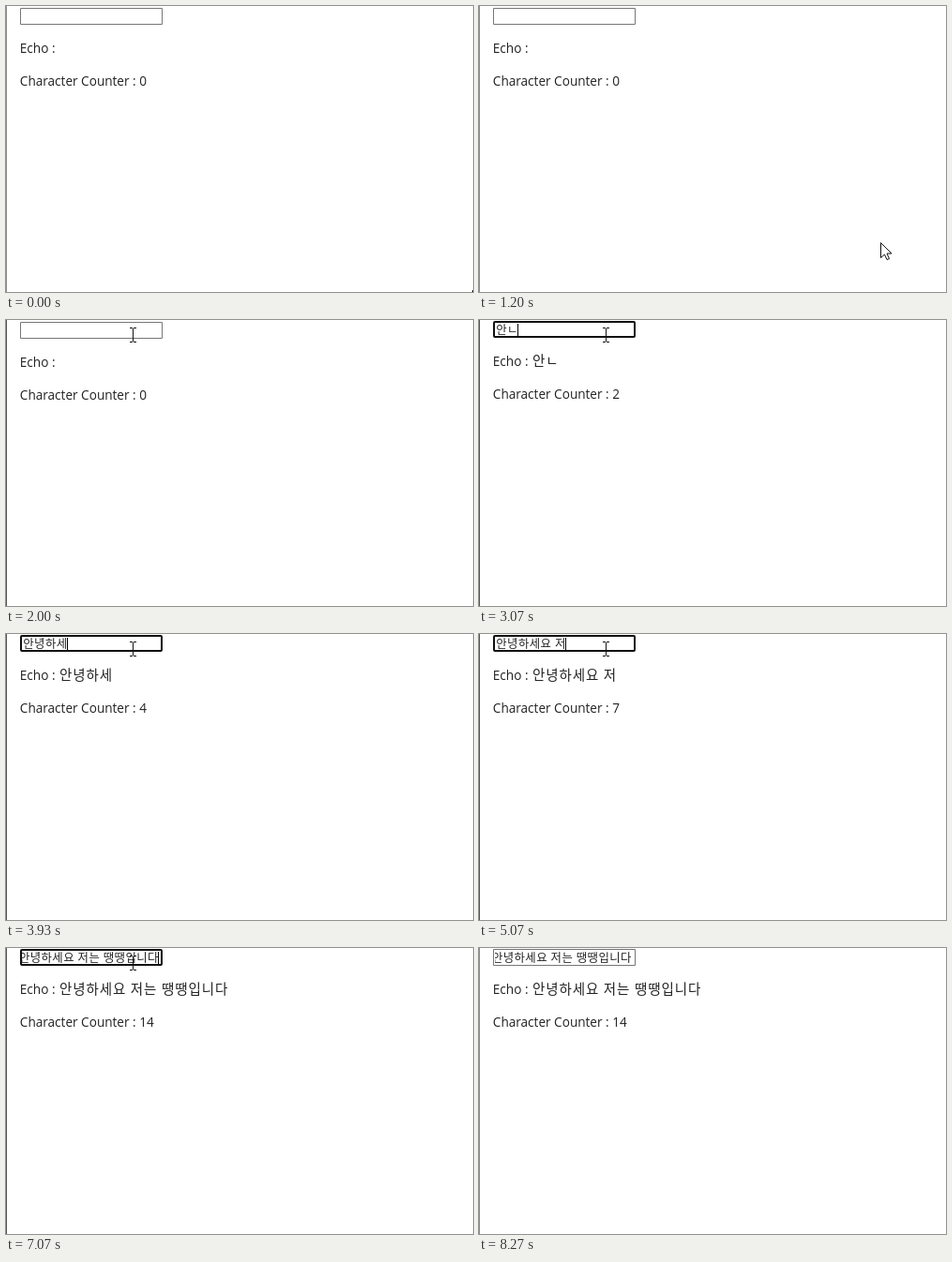
Write an HTML page with a canvas that moves like this. It is 498 px wide and 305 px high and loops after 8.47 s.

```html
<!DOCTYPE html>
<html lang="ko">
<head>
<meta charset="utf-8">
<title>Echo and character counter</title>
<style>
  html, body { margin: 0; width: 100%; height: 100%; overflow: hidden; background: #fff; }
  canvas { display: block; }
</style>
</head>
<body>
<canvas id="stage" width="498" height="305"></canvas>
<script>
const ctx = document.getElementById('stage').getContext('2d', { alpha: false });
const LOOP = 8470, TICK = 1000 / 15, BLINK = 535;
const FOCUS = 2325, BLUR = 8265, ACTIVE = 1795;

const hangul = size => `300 ${size}px "Open Sans", "Noto Sans CJK KR", sans-serif`;
const LABEL = { font: '13.6px "Open Sans", "Noto Sans", sans-serif', spacing: '0px' };
const ECHO = { font: hangul(14.5), spacing: '0.9px' };
const INPUT = { font: hangul(12.4), spacing: '0.4px' };

// Each keystroke: time and the field's value while the syllable is composed.
const hello = '안녕하세요', me = hello + ' 저는 ';
const keys = [
  [2330, 'ㅇ'], [2730, '아'], [2870, '안'],
  [3070, '안ㄴ'], [3130, '안녀'], [3270, '안녕'],
  [3600, '안녕ㅎ'], [3670, '안녕하'], [3800, '안녕핫'],
  [3930, '안녕하세'], [4000, '안녕하셍'], [4130, hello],
  [4930, hello + ' '], [5000, hello + ' ㅈ'], [5070, hello + ' 저'],
  [5200, hello + ' 전'], [5270, hello + ' 저느'], [5330, hello + ' 저는'],
  [5470, me], [6000, me + 'ㄸ'], [6130, me + '때'], [6200, me + '땡'],
  [6330, me + '땡ㄸ'], [6470, me + '땡때'], [6530, me + '땡땡'],
  [6600, me + '땡땡ㅇ'], [6730, me + '땡땡이'], [6870, me + '땡땡입'],
  [6930, me + '땡땡입니'], [7000, me + '땡땡입닏'], [7070, me + '땡땡입니다']
];

// Pointer paths: time, x, y. Each one is visible from its first to its last time.
const paths = [
  [[0, 497, 303], [133, 493, 298], [199, 495, 302]],
  [[1133, 484, 292], [1333, 318, 172], [1533, 180, 60], [1667, 148, 31],
   [1800, 139, 20], [1933, 135, 16], [7467, 135, 16],
   [7533, 143, 32], [7667, 205, 128], [7800, 304, 286], [7866, 304, 305]]
];

function pointerAt(t) {
  const time = Math.floor((t + 5) / TICK) * TICK;
  for (const path of paths) {
    for (let i = 1; i < path.length; i++) {
      const [t0, x0, y0] = path[i - 1], [t1, x1, y1] = path[i];
      if (time + 1 < t0 || time >= t1) continue;
      const k = Math.max(0, (time - t0) / (t1 - t0));
      return [Math.round(x0 + (x1 - x0) * k), Math.round(y0 + (y1 - y0) * k)];
    }
  }
  return null;
}

function setStyle({ font, spacing }) {
  ctx.font = font;
  ctx.letterSpacing = spacing;
}

function text(str, x, y, style) {
  setStyle(style);
  ctx.fillStyle = '#222';
  ctx.fillText(str, x, y);
}

function drawField(value, t, lastKey, top) {
  const focused = t >= FOCUS && t < BLUR;
  setStyle(INPUT);
  const end = 18 + ctx.measureText(value).width;
  const scroll = Math.max(0, end - 162.5);

  ctx.save();
  ctx.beginPath();
  ctx.rect(17, top + 2, 148, 14);
  ctx.clip();
  text(value, 18.3 - scroll, top + 14, INPUT);
  ctx.restore();

  ctx.strokeStyle = focused ? '#101010' : '#767676';
  ctx.lineWidth = focused ? 2 : 1;
  ctx.beginPath();
  if (focused) ctx.roundRect(16, top + 1, 150, 16, 1);
  else ctx.rect(15.5, top + .5, 151, 17);
  ctx.stroke();

  if (focused && (t - lastKey) % (2 * BLINK) < BLINK) {
    ctx.fillStyle = '#000';
    ctx.fillRect(Math.round(end - scroll - .3), top + 3, 1, 13);
  }
}

function drawArrow(x, y) {
  const points = [[0, 0], [0, 16], [4, 12.5], [6.5, 18], [9, 17], [6.5, 11.5], [11.5, 11.5]];
  ctx.beginPath();
  for (const [dx, dy] of points) ctx.lineTo(x + .5 + dx, y + .5 + dy);
  ctx.closePath();
  ctx.fillStyle = '#fff';
  ctx.fill();
  ctx.strokeStyle = '#111';
  ctx.lineWidth = 1;
  ctx.stroke();
}

function drawBeam(x, y) {
  ctx.fillStyle = '#111';
  ctx.fillRect(x, y - 7, 1, 14);
  for (const dy of [-8, 7]) {
    ctx.fillRect(x - 3, y + dy, 3, 1);
    ctx.fillRect(x + 1, y + dy, 3, 1);
  }
}

function draw(t) {
  ctx.fillStyle = '#fff';
  ctx.fillRect(0, 0, 498, 305);
  ctx.fillStyle = t >= ACTIVE && t < BLUR ? '#555' : '#8c8c8c';
  ctx.fillRect(0, 0, 1, 305);

  let value = '', lastKey = FOCUS;
  for (const [time, typed] of keys) {
    if (t >= time - 5) [lastKey, value] = [time, typed];
  }
  const shift = t >= FOCUS ? 1 : 0;
  drawField(value, t, lastKey, 2 - shift);
  text('Echo :', 14.8, 50 - shift, LABEL);
  text(value, 57, 50 - shift, ECHO);
  text('Character Counter : ' + value.length, 14.8, 85 - shift, LABEL);

  const pointer = pointerAt(t);
  if (!pointer) return;
  const [x, y] = pointer;
  if (x > 15 && x < 167 && y < 21) drawBeam(x, y);
  else drawArrow(x, y);
}

function frame() {
  draw(performance.now() % LOOP);
  requestAnimationFrame(frame);
}
frame();
</script>
</body>
</html>
```
